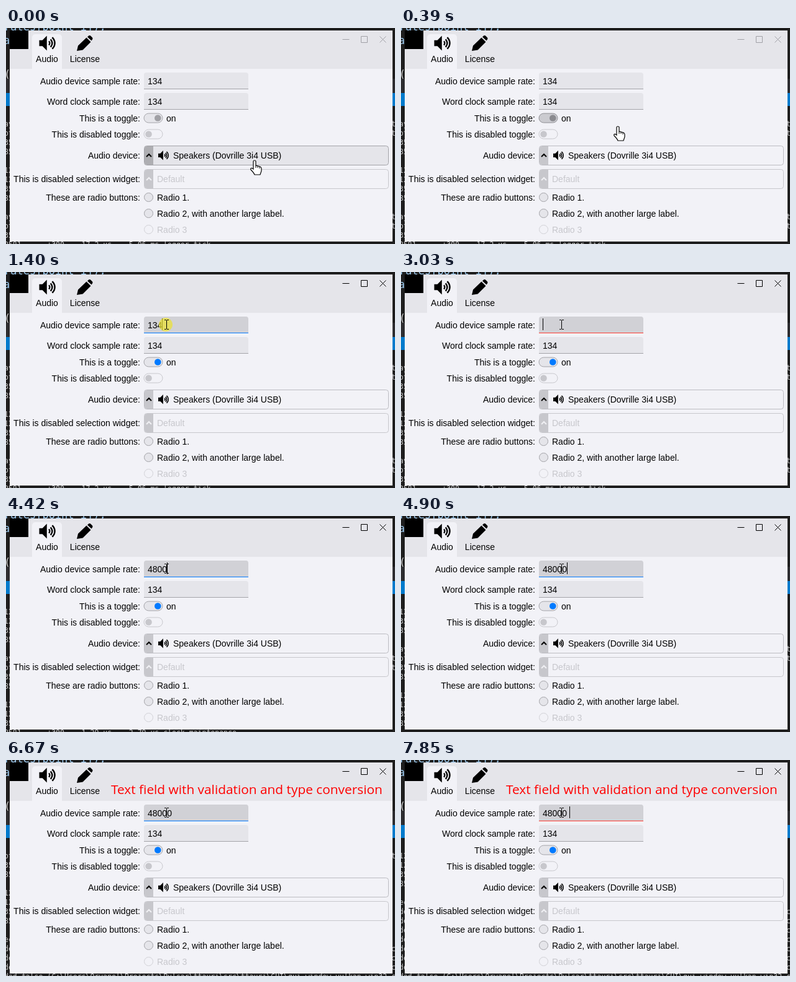
An HTML page with a canvas that plays this animation: 626 px wide and 349 px high, repeating every 8000 ms.

```html
<!DOCTYPE html>
<html lang="en">
<head>
<meta charset="utf-8">
<title>Audio settings</title>
<style>
html, body { margin: 0; width: 100%; height: 100%; overflow: hidden; background: #1e1e1e; }
canvas { display: block; }
</style>
</head>
<body>
<canvas id="stage" width="626" height="349"></canvas>
<script>
const ctx = document.getElementById('stage').getContext('2d');
const LOOP = 8000;
const SANS = '14px "Liberation Sans", Arial, sans-serif';
const MONO = '"DejaVu Sans Mono", monospace';
const C = {
  body: '#f2f2f7', header: '#e5e5ea', hover: '#d1d1d6', edge: '#a3a3a8', soft: '#bcbcc2', faint: '#c7c7cc',
  blue: '#007aff', red: '#ff3b30', ink: '#000'
};

// Timelines: [start time, value]
const scroll = [[0, 0], [3180, 1], [3410, 2], [4270, 4], [4420, 5], [4810, 6], [5040, 7], [5510, 8],
  [5740, 9], [6520, 10], [6670, 11], [6840, 12], [7140, 13], [7390, 14], [7850, 15]];
const typed = [[0, '134'], [2710, '13'], [2870, '1'], [3030, ''], [3890, '4'], [3960, '48'],
  [4270, '480'], [4420, '4800'], [4650, '48000'], [7620, '48000 ']];
const caret = [[0, false], [1230, true], [1930, false], [2480, true], [3580, false], [3890, true],
  [5200, false], [5740, true], [6290, false], [6840, true], [7390, false], [7620, true]];
const line = [[0, C.edge], [1230, C.blue], [3030, C.red], [3890, C.blue], [7620, C.red]];
const mouse = [[0, [400, 214]], [230, [390, 203]], [310, [370, 180]], [390, [349, 159]],
  [460, [318, 137]], [540, [288, 111]], [610, [268, 92]], [690, [258, 85]]];

const wide = s => s.padEnd(90) + 't)';
const stats = (a, b) => '8581      +300    ' + a + b;
const block = [wide('ay'), wide('ot'), '35', stats('17.2 us    ', '5.06 ms logger tick'), ' :1', '12', '12',
  '35', stats('1.29 us    ', '2.79 us clock maintenance'), ''];
const path = 'ded=false (C:\\Users\\Orvanel\\Projects\\Pulsar\\ttauri\\src\\ttauri\\GUI\\gui_window_vulkan_win32.cpp';
const log = [...block, ...block, 'ec', ...Array(12).fill(path)];

const speaker = new Path2D('M0 7.5H5L12 .5V24L5 17H0Z');
const pencil = new Path2D('M114 37L116 28.5L129.5 15.5L136.5 22.5L123.5 35.5ZM131 14.5L133 12.5Q134.5 11.5 136 12.5L139 15.5Q140 17 139 18.5L137.5 20.5Z');
const hand = new Path2D('M-2 1.5Q-2 0 0 0T2 1.5V8L9 10Q11 11 11 13V17Q10 20 9 23H0Q-1 20 -6 15Q-7 12 -4 12.5L-2 14Z');

const at = (track, t) => track.reduce((v, [start, next]) => t >= start ? next : v, track[0][1]);

function rect(x, y, w, h, color) {
  ctx.fillStyle = color;
  ctx.fillRect(x, y, w, h);
}

function text(s, x, y, color = C.ink, font = SANS, align = 'left') {
  ctx.font = font;
  ctx.textAlign = align;
  ctx.fillStyle = color;
  ctx.fillText(s, x, y);
}

function shape(fill, stroke, draw, width = 1) {
  ctx.beginPath();
  draw();
  if (fill) { ctx.fillStyle = fill; ctx.fill(); }
  if (stroke) { ctx.strokeStyle = stroke; ctx.lineWidth = width; ctx.stroke(); }
}

const box = (x, y, w, h, r, fill, stroke) => shape(fill, stroke, () => ctx.roundRect(x, y, w, h, r));
const disc = (x, y, r, fill, stroke) => shape(fill, stroke, () => ctx.arc(x, y, r, 0, 7));
const poly = (points, color, width) => shape(null, color, () => points.forEach(p => ctx.lineTo(...p)), width);

function speakerIcon(x, y, scale) {
  ctx.save();
  ctx.translate(x, y);
  ctx.scale(scale, scale);
  ctx.fillStyle = C.ink;
  ctx.fill(speaker);
  for (const r of [4, 8, 12]) {
    shape(null, C.ink, () => ctx.arc(12.5, 12.2, r, -.85, .85), 2.4);
  }
  ctx.restore();
}

function desktop(t) {
  rect(0, 0, 626, 349, '#1e1e1e');
  text('rates[point_i]);', -3, 4, '#9cc9ee', '17px ' + MONO);
  text('a', -4, 26, '#9cc9ee', '17px ' + MONO);
  text('(', -3, 81, '#c8c8c8', '17px ' + MONO);
  rect(0, 82, 626, 23, '#2d2d30');
  rect(0, 105, 626, 21, '#007acc');
  const first = at(scroll, t);
  for (let i = 0; i < 14; i++) {
    text(log[first + i], -3, 159 + i * 15, '#c8c8c8', '11.5px ' + MONO);
  }
}

function frame(active) {
  rect(6, 4, 616, 341, C.body);
  rect(6, 4, 616, 62, C.header);
  rect(6, 4, 30, 30, '#000');
  box(42, 10, 48, 57, [5, 5, 0, 0], C.body);
  speakerIcon(53.5, 12, 1.02);
  ctx.fillStyle = C.ink;
  ctx.fill(pencil);
  text('Audio', 66, 55, C.ink, SANS, 'center');
  text('License', 127, 55, C.ink, SANS, 'center');
  const color = active ? C.ink : '#a0a0a6';
  poly([[541.5, 18.5], [552.5, 18.5]], color);
  box(571.5, 13.5, 10, 10, 0, null, color);
  poly([[601.5, 13.5], [611.5, 23.5]], color);
  poly([[611.5, 13.5], [601.5, 23.5]], color);
}

function field(y, value, fill, edge) {
  box(222, y, 168, 27, [4, 4, 0, 0], fill);
  rect(222, y + 26, 168, 1, edge);
  text(value, 228, y + 18.5);
}

function toggle(y, knobX, fill, edge, knob) {
  box(222, y, 30, 15, 7.5, fill, edge);
  disc(knobX, y + 7.5, 5.3, knob);
}

function select(y, fill, edge, button, arrow) {
  box(222.5, y + .5, 393, 31, 4, fill, edge);
  box(223, y + 1, 14, 30, [4, 0, 0, 4], button);
  poly([[226, y + 18], [230, y + 14], [234, y + 18]], arrow, 2);
}

function form(t, active, y) {
  [['Audio device sample rate:', 90.5], ['Word clock sample rate:', 123.5], ['This is a toggle:', 150.5],
    ['This is disabled toggle:', 176.5], ['Audio device:', 211], ['This is disabled selection widget:', 249],
    ['These are radio buttons:', 278.5]].forEach(([s, base]) => text(s, 216, base, C.ink, SANS, 'right'));

  const over = (top, bottom) => y >= top && y < bottom;
  const value = at(typed, t);
  field(72, value, over(72, 100) ? C.hover : C.header, at(line, t));
  if (at(caret, t)) rect(Math.round(228 + ctx.measureText(value).width), 75, 1, 19, C.ink);
  field(105, '134', over(105, 133) ? C.hover : C.header, C.edge);

  const hot = over(134, 162);
  toggle(138, 244.3, hot ? '#cbcbd0' : C.header, hot ? '#8e8e93' : C.edge, active ? C.blue : hot ? '#8a8a8f' : '#a0a0a5');
  text('on', 258, 150.5);
  toggle(164, 229.5, null, C.faint, C.faint);

  const picked = over(190, 222);
  select(190, picked ? C.header : C.body, picked ? C.edge : C.soft, picked ? '#aeaeb2' : C.faint, C.ink);
  speakerIcon(245, 197.7, .66);
  text('Speakers (Dovrille 3i4 USB)', 269, 211);
  select(228, C.body, C.faint, C.faint, '#f0f0f4');
  text('Default', 243, 249, C.faint);

  [['Radio 1.', 273.5], ['Radio 2, with another large label.', 299.5]].forEach(([s, mid]) => {
    disc(229.5, mid, 7, C.header, C.edge);
    text(s, 243, mid + 5);
  });
  disc(229.5, 325.5, 7, null, '#d1d1d6');
  text('Radio 3', 243, 330.5, C.faint);
}

function pointer(t, [x, y]) {
  if (t >= 1150 && t < 1470) disc(x - 1, y, 11, 'rgba(236,226,50,.72)');
  if (y < 133) {
    rect(x, y - 7, 1, 14, C.ink);
    for (const end of [y - 8, y + 7]) {
      rect(x - 3, end, 3, 1, C.ink);
      rect(x + 1, end, 3, 1, C.ink);
    }
    return;
  }
  ctx.save();
  ctx.translate(x, y);
  ctx.lineWidth = 1.2;
  ctx.fillStyle = '#fff';
  ctx.strokeStyle = C.ink;
  ctx.fill(hand);
  ctx.stroke(hand);
  poly([[2, 8], [2, 12]], C.ink);
  poly([[5, 9], [5, 12]], C.ink);
  poly([[8, 10], [8, 13]], C.ink);
  ctx.restore();
}

function draw(now) {
  const t = now % LOOP;
  const active = t >= 1150;
  const pos = at(mouse, t);
  desktop(t);
  frame(active);
  form(t, active, pos[1]);
  if (t >= 5510) {
    text('Text field with validation and type conversion', 169, 55, '#f00', '20.85px "Open Sans", "Noto Sans", sans-serif');
  }
  pointer(t, pos);
}

const start = performance.now();
(function tick() {
  draw(performance.now() - start);
  requestAnimationFrame(tick);
})();
</script>
</body>
</html>
```
